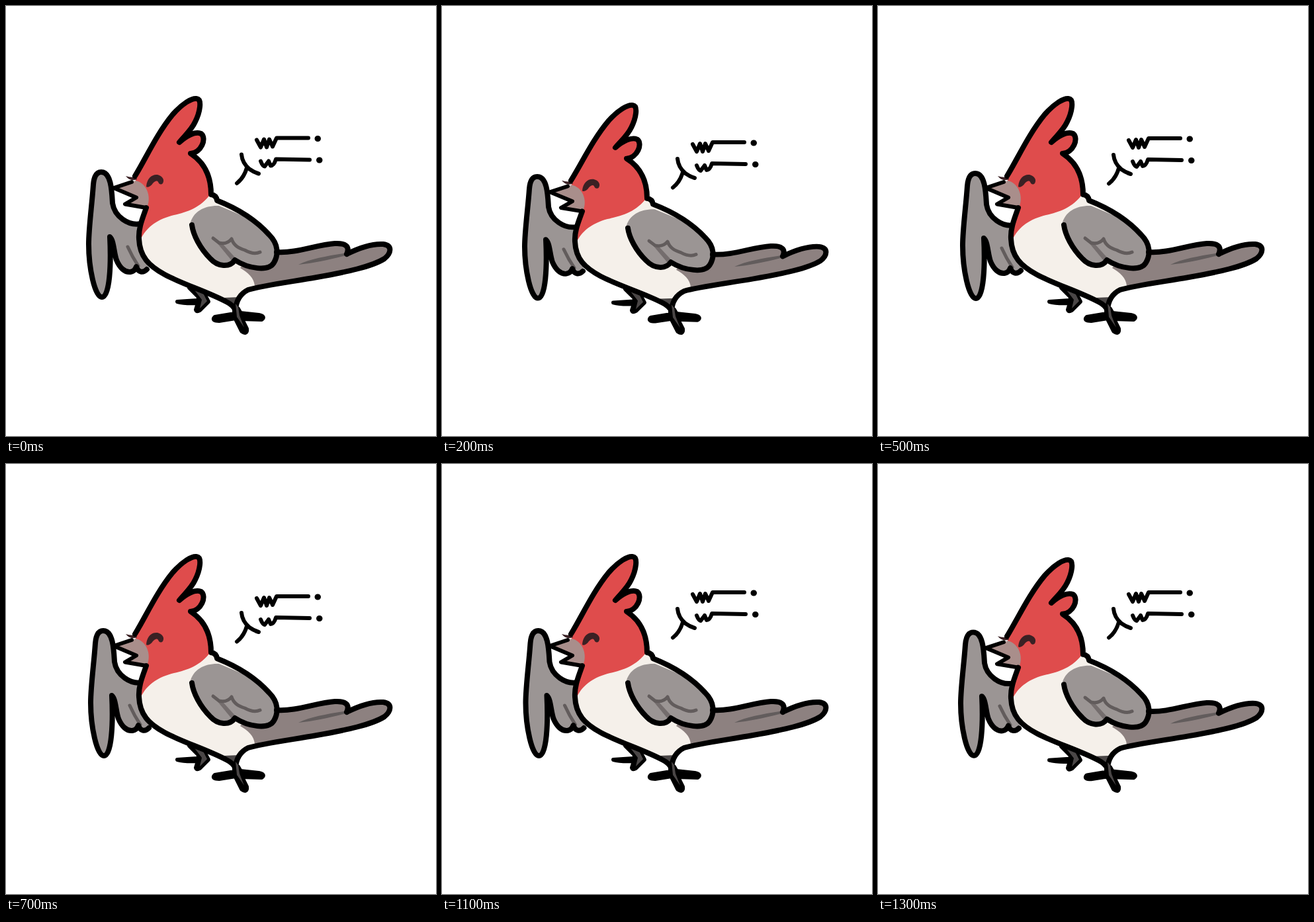
An HTML page that plays this animation: 650x650 px, repeating every 1400 ms.

```html
<!DOCTYPE html>
<html lang="en">
<head>
<meta charset="utf-8">
<title>Laughing bird</title>
<style>
html, body { margin: 0; width: 100%; height: 100%; overflow: hidden; background: #fff; }
svg { display: block; width: 100vw; height: 100vh; }
.ink { fill: none; stroke: #000; stroke-width: 8; }
.thin { stroke-width: 6; }
.foot { fill: #000; }
.soft { fill: none; stroke: #625c5c; stroke-width: 5; }
.grey { fill: #9b9594; }
.dark { fill: #4a4646; }
.eye { fill: #3a2124; }
</style>
</head>
<body>
<svg viewBox="0 0 650 650" stroke-linecap="round" stroke-linejoin="round">
  <g id="bird">
    <g id="farWing">
      <path class="grey" d="M144 251C137 251 133 258 132 270C130 300 125 335 125 360C125 395 134 440 145 440C157 440 159 390 157 349C163 354 163 373 167 384C172 396 180 402 188 402L213 400L220 330L201 329C180 331 164 318 161 298C160 280 159 251 144 251Z"/>
      <path class="soft" d="M184 364C189 375 194 384 200 393"/>
      <path class="ink" d="M204 329C185 333 164 318 161 298C160 280 159 251 144 251C137 251 133 258 132 270C130 300 125 335 125 360C125 395 134 440 145 440C157 440 159 390 157 349C163 354 163 373 167 384C172 396 180 403 188 402C194 401 196 397 197 394C200 403 207 404 213 398"/>
    </g>

    <!-- far leg -->
    <path class="ink foot thin" d="M277 426L292 441L289 445L259 447Q270 450 290 449L287 459Q288 463 293 460L306 447L298 432Z"/>
    <path class="dark" d="M283 427L297 432L304 446L293 457L296 444Z"/>

    <!-- tail -->
    <path d="M350 385L409 372C440 374 468 361 497 359C514 358 520 364 515 375C535 365 555 359 570 360C585 362 582 374 572 382C553 394 515 402 470 410C430 417 385 423 366 429L350 440Z" fill="#8d8180"/>
    <path d="M442 391C460 382 490 377 517 373L518 376C492 383 466 389 442 391Z" fill="#625c5c"/>

    <!-- body -->
    <path d="M201 350C201 378 216 393 240 406C268 421 305 432 333 446L351 440Q356 433 376 423C375 411 366 403 354 396L400 340L320 296L309 281L225 315Z" fill="#f5f0ea"/>
    <path class="dark" d="M329 441L353 440L347 460Z"/>

    <!-- head -->
    <path d="M196 264L195 256C211 231 228 193 252 164C267 147 281 139 288 140C297 141 293 161 286 175C280 188 270 196 262 206C273 196 286 189 295 193C304 200 295 222 279 223C301 237 310 259 310 283C293 307 271 312 250 317C225 324 211 337 204 352C201 332 208 321 213 304Z" fill="#df4c4c"/>
    <path d="M162 275L196 264C211 267 221 286 213 305L180 299L197 290Z" fill="#a98e8b"/>
    <path class="eye" d="M181 257Q189 260 197 258L198 262Q188 266 181 257Z"/>
    <path class="eye" d="M212 273C213 260 221 254 229 255C237 257 240 263 237 268C234 271 231 269 230 266C228 263 225 265 222 268C219 273 213 275 212 273Z"/>

    <!-- near wing -->
    <path class="grey" d="M278 331C282 309 303 301 322 302L360 318C390 336 414 361 409 380C400 403 370 400 346 384C338 396 320 394 309 382C293 366 283 346 278 331Z"/>
    <path d="M314 352L328 360L347 381L342 386Z" fill="#746d6d"/>
    <path class="soft" d="M313 351L322 358Q334 361 341 352C344 362 352 366 361 369C370 374 378 375 384 372"/>

    <!-- outlines -->
    <path class="ink" d="M195 257C211 231 228 193 252 164C267 147 281 139 288 140C297 141 293 161 286 175C280 188 270 196 262 206C273 196 286 189 295 193C304 200 295 222 279 223C301 237 310 259 310 285Q318 286 319 294C352 307 380 326 398 346C412 360 412 376 405 388C397 402 366 397 346 384C338 396 320 394 309 382C293 366 283 346 281 331"/>
    <path class="ink thin" d="M190 266L163 275L197 289.500L180 299.500L212 305"/>
    <path class="ink" d="M212 305C206 322 200 336 201 352C202 379 216 393 240 406C268 421 305 432 333 447Q343 452 347 460Q348 438 366 429C385 423 430 417 470 410C515 402 553 394 572 382C582 374 585 362 570 360C555 359 535 365 515 375M409 372C440 374 468 361 497 359C514 358 520 364 515 375"/>

    <!-- near leg -->
    <path class="ink foot" d="M346 458L346 466L316 471Q312 475 322 475L347 471L357 491Q364 496 363 488L355 472L386 473Q391 470 382 468L354 465L350 458Z"/>
    <path class="dark" d="M347 450L351 455L353 468L360 486L349 470Z"/>
  </g>

  <g id="noise" class="ink thin">
    <path d="M356 225C357 236 362 242 368 247Q375 252 382 254M364 245C361 256 356 263 349 268.500"/>
    <path d="M379 203L385 214L390 202L394 214L398 202L403 213L409 200H457"/>
    <path d="M385 235Q388 243 391 243L397 235L400 242Q405 242 408 232L459 233"/>
    <path d="M471 201h.5M473.500 233.500h.5" stroke-width="9"/>
  </g>
</svg>
<script>
const STEP = 100, FLOOR = 500;
const squash = [0, 0, 1, 0, 1, 0, 1, 0, 1, 0, 1, 0, 1, .5];
const noiseY = [-.5, 0, 6, 0, 6, 0, 6, 0, 6, 0, 0, -6, -6, -6];
const wingX = [0, 2, 0, 2, 0, 3, 0, 3, 0, 3, 0, 1.5, 0, 0];
const wingY = [0, 1, 0, 1, 0, 2, 0, 1, 0, 2, 0, 1, 0, 0];

const move = (id, value) => document.getElementById(id).setAttribute("transform", value);

function draw(now) {
  const i = Math.floor(now / STEP) % squash.length;
  const k = 1 - .0275 * squash[i];
  move("bird", `translate(0 ${FLOOR * (1 - k)}) scale(1 ${k})`);
  move("farWing", `translate(${wingX[i]} ${wingY[i]})`);
  move("noise", `translate(0 ${noiseY[i]})`);
}

const start = performance.now();
function tick() {
  draw(performance.now() - start);
  requestAnimationFrame(tick);
}
tick();
</script>
</body>
</html>
```
